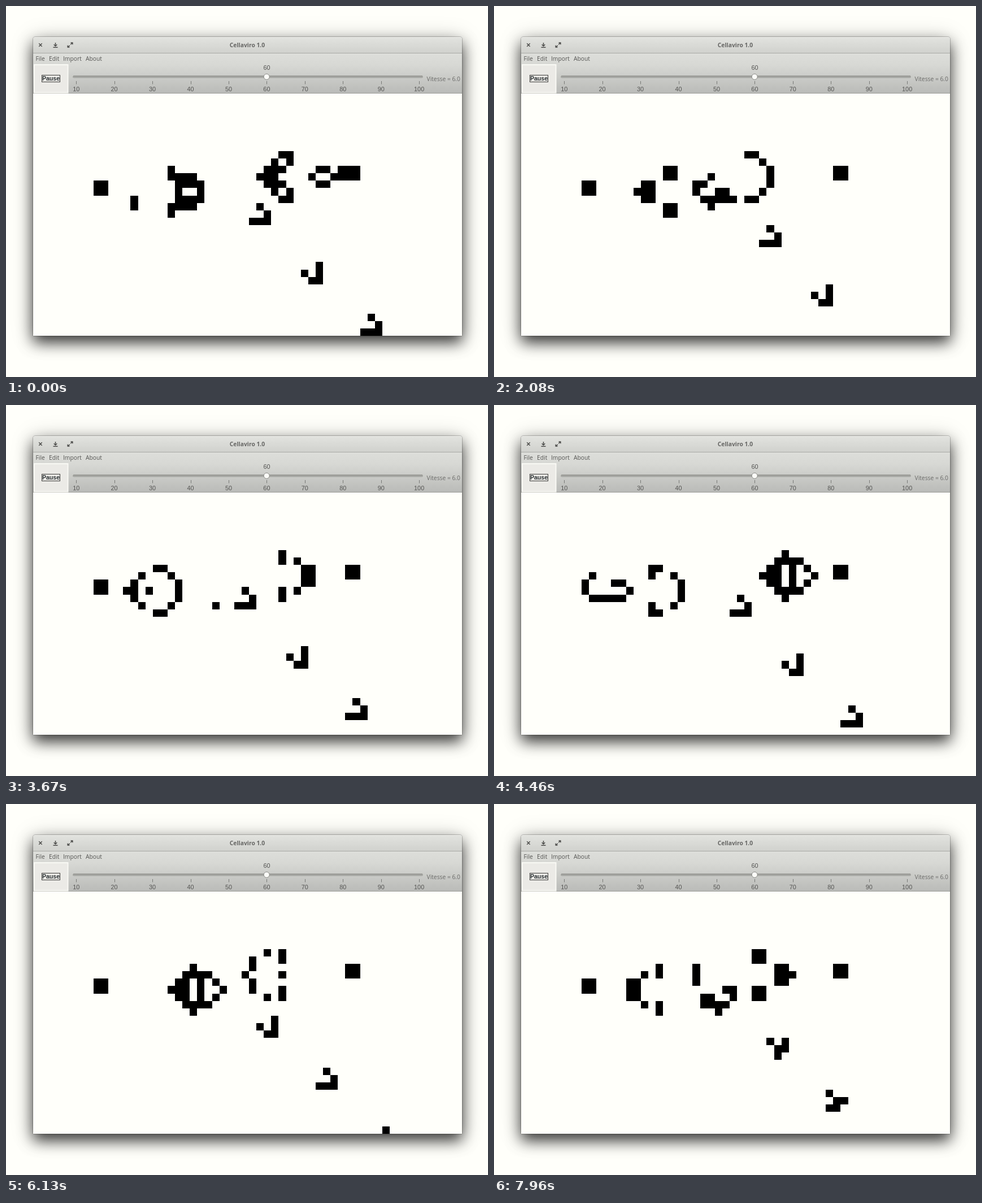
An HTML page that plays this animation: 853x657 px, repeating every 8 s.

```html
<!DOCTYPE html>
<html lang="en">
<head>
<meta charset="utf-8">
<title>Cellaviro 1.0</title>
<style>
  html, body { margin: 0; width: 100%; height: 100%; overflow: hidden; background: #fffffa; }
  #shadow {
    position: absolute; left: 48px; top: 55px; width: 759px; height: 529px; border-radius: 4px 4px 2px 2px;
    box-shadow: 0 0 1px 1px rgba(0,0,0,.22), 0 12px 26px rgba(0,0,0,.72), 0 4px 40px rgba(0,0,0,.22);
  }
  svg { position: absolute; left: 0; top: 0; display: block; }
  .ui { font: 10.3px "Open Sans", "Noto Sans", sans-serif; fill: #555553; }
  .num { font: 10.9px "Liberation Sans", Arial, sans-serif; fill: #555553; text-anchor: middle; }
  .title { font-weight: 700; fill: #666664; text-anchor: middle; }
  .pause { font-size: 10.6px; font-weight: 700; fill: #2e3436; }
  .icon { fill: none; stroke: #4c4c4a; stroke-width: 1.5; }
</style>
</head>
<body>
<div id="shadow"></div>
<svg width="853" height="657" viewBox="0 0 853 657">
  <defs>
    <linearGradient id="head" x2="0" y2="1">
      <stop stop-color="#e2e3df"/><stop offset="1" stop-color="#d0d1cd"/>
    </linearGradient>
    <linearGradient id="bar" x2="0" y2="1">
      <stop stop-color="#dddeda"/><stop offset=".3" stop-color="#d7d8d4"/><stop offset="1" stop-color="#babbb8"/>
    </linearGradient>
    <clipPath id="board"><rect x="48" y="155" width="759" height="429"/></clipPath>
  </defs>

  <path d="M48 84V59a4 4 0 0 1 4-4H803a4 4 0 0 1 4 4V84Z" fill="url(#head)"/>
  <path d="M51 55.5H804" stroke="#f0f0ec"/>
  <rect x="48" y="84" width="759" height="70" fill="url(#bar)"/>
  <path d="M48 83.5H807" stroke="#a9aaa6"/>
  <rect x="48" y="154" width="759" height="430" fill="#fffffa"/>
  <path d="M48 154.5H807" stroke="#9b9c98"/>

  <path class="icon" stroke-width="1.8" d="M58.3 66.3l5.4 5.4M63.7 66.3l-5.4 5.4"/>
  <g class="icon">
    <path d="M87.5 65v5M84.7 68.2l2.8 2.8l2.8-2.8M83.5 73.2h8"/>
    <path d="M114.3 68.2l3.5-3.5M114.5 64.9h3.3v3.3M112.7 69.8l-3.5 3.5M109.2 69.8v3.3h3.3"/>
  </g>
  <text class="ui title" x="427" y="73">Cellaviro 1.0</text>

  <g class="ui">
    <text x="52.5" y="97">File</text>
    <text x="76" y="97">Edit</text>
    <text x="101" y="97">Import</text>
    <text x="141" y="97">About</text>
    <text x="744.5" y="132.5" fill="#6a6a68">Vitesse = 6.0</text>
  </g>

  <rect x="50" y="104" width="59.5" height="49.5" fill="#ebeae6" stroke="#f9f9f4" stroke-width="2"/>
  <rect x="63.5" y="122.5" width="32" height="12" fill="none" stroke="#3c3c3a"/>
  <text class="num pause" x="79.5" y="132">Pause</text>

  <rect x="118" y="123.5" width="620" height="4" rx="2" fill="#a5a6a2"/>
  <path d="M119 124H737" stroke="#8b8c88"/>
  <circle cx="461.2" cy="125.3" r="5" fill="#fcfcf8" stroke="#8a8b87"/>
  <text class="num" x="461.5" y="112.7">60</text>
  <g id="scale"></g>

  <path id="cells" clip-path="url(#board)" shape-rendering="crispEdges"/>
</svg>
<script>
const LOOP = 8000, RATE = 6, GENS = 48, CELL = 13.1;
const px = x => Math.round(154.9 + CELL * x);
const py = y => Math.round(256.9 + CELL * y);

let ticks = '';
for (let i = 0; i < 10; i++) {
  const x = 124.2 + 67.44 * i;
  ticks += `<path d="M${Math.round(x) + .5} 133v5.5" stroke="#777875"/>
    <text class="num" x="${x}" y="151">${10 + 10 * i}</text>`;
}
document.getElementById('scale').innerHTML = ticks;

// Cells are keyed as y * W + x, with an offset to keep keys positive.
const W = 256, PAD = 32;
const key = (x, y) => (y + PAD) * W + x + PAD;

function start() {
  const live = new Set();
  // Horizontal run from x0 to x1 in row y.
  const run = (x0, x1, y) => { for (let x = x0; x <= x1; x++) live.add(key(x, y)); };
  const mirrored = (axis, runs) => runs.forEach(([a, b, dy]) => {
    run(a, b, axis - dy);
    run(a, b, axis + dy);
  });
  const glider = (x, y) => { run(x + 1, x + 1, y); run(x + 2, x + 2, y + 1); run(x, x + 2, y + 2); };

  run(0, 1, 4); run(0, 1, 5);
  run(5, 5, 6); run(5, 5, 7);
  mirrored(5, [[10, 10, 3], [10, 13, 2], [11, 14, 1], [11, 11, 0], [14, 14, 0]]);
  mirrored(3, [[25, 26, 3], [24, 24, 2], [26, 26, 2], [23, 25, 1], [22, 24, 0]]);
  mirrored(3, [[30, 31, 1], [29, 29, 0]]);
  run(33, 35, 2); run(32, 35, 3);
  glider(21, 7);
  glider(36, 22);
  run(30, 30, 15); run(28, 28, 16); run(30, 30, 16); run(29, 30, 17);
  return live;
}

function step(live) {
  const count = new Map();
  for (const k of live)
    for (const dy of [-W, 0, W])
      for (const dx of [-1, 0, 1])
        if (dx || dy) count.set(k + dx + dy, (count.get(k + dx + dy) || 0) + 1);
  const next = new Set();
  for (const [k, n] of count) if (n === 3 || (n === 2 && live.has(k))) next.add(k);
  return next;
}

function outline(live) {
  let d = '';
  for (const k of live) {
    const x = k % W - PAD, y = Math.floor(k / W) - PAD;
    d += `M${px(x)} ${py(y)}H${px(x + 1)}V${py(y + 1)}H${px(x)}Z`;
  }
  return d;
}

const paths = [];
for (let live = start(); paths.length < GENS; live = step(live)) paths.push(outline(live));

const cells = document.getElementById('cells');
let shown = -1;
function draw(now) {
  const t = now % LOOP;
  // A few ms of lead keep each step on its video tick.
  const gen = Math.min(GENS - 1, Math.floor((t + 5) * RATE / 1000));
  if (gen !== shown) cells.setAttribute('d', paths[shown = gen]);
}
function tick() {
  draw(performance.now());
  requestAnimationFrame(tick);
}
tick();
</script>
</body>
</html>
```
